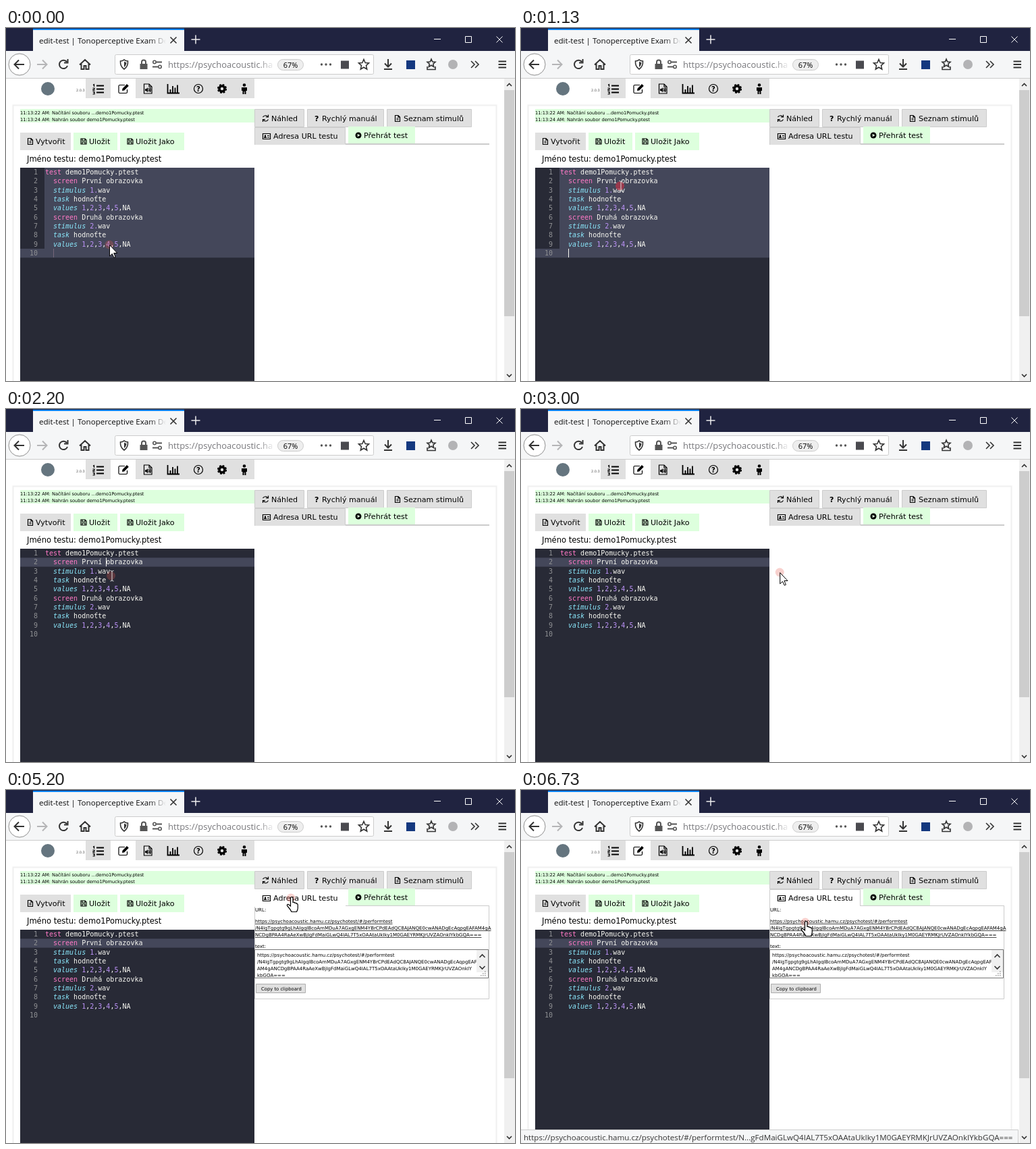
An HTML page for the animation above (8000 ms loop, 754 px wide and 523 px high).

```html
<!DOCTYPE html>
<html lang="cs">
<head>
<meta charset="utf-8">
<title>Test editor</title>
<style>
html, body { margin: 0; height: 100%; overflow: hidden; background: #fff }
svg { display: block; width: 100vw; height: 100vh }
text { font-family: "DejaVu Sans", Verdana, sans-serif; font-size: 11.1px; white-space: pre }
.ui { font-family: "Open Sans", "Noto Sans", sans-serif; font-size: 11.6px }
.code text { font-family: "DejaVu Sans Mono", monospace; font-size: 10px; fill: #f8f8f2 }
.code .num { fill: #909194; text-anchor: end }
.log { font-size: 6.7px }
.small text { font-size: 7px }
.k { fill: #ff79c6 }
.i { fill: #8be9fd; font-style: italic }
.n { fill: #bd93f9 }
.line { fill: none; stroke: #333; stroke-width: 1.6 }
.ico { fill: none; stroke: #000; stroke-width: 1.2 }
.grey { fill: #e0e0e0 }
.green { fill: #dfd }
.tab { fill: #e0e0e0; stroke: #ccc }
</style>
</head>
<body>
<svg viewBox="0 0 754 523" preserveAspectRatio="none">
<defs>
  <linearGradient id="fadeTab"><stop stop-color="#f5f6f7" stop-opacity="0"/><stop offset="1" stop-color="#f5f6f7"/></linearGradient>
  <linearGradient id="fadeUrl"><stop stop-color="#fff" stop-opacity="0"/><stop offset="1" stop-color="#fff"/></linearGradient>
  <clipPath id="area"><path d="M369 237H697V277H369z"/></clipPath>
  <path id="doc" class="ico" d="M-3.5-4.5H1L3.5-2V4.5H-3.5zM1-4.5V-2H3.5M-1.5 0H1.5M-1.5 2H1.5"/>
  <path id="disk" class="ico" d="M-4-4H2L4-2V4H-4zM-2-4V-1H2V-4M-2 4V1H2V4"/>
</defs>

<!-- window frame -->
<path d="M0 0H754V34H0z" fill="#202340"/>
<path d="M40 1H264V34H40z" fill="#f5f6f7"/>
<path d="M40 1H264V3H40z" fill="#0a84ff"/>
<text class="ui" x="49" y="23" fill="#0c0c0d">edit-test | Tonoperceptive Exam Desk</text>
<path d="M212 8H237V30H212z" fill="url(#fadeTab)"/><path d="M237 8H263V30H237z" fill="#f5f6f7"/>
<path class="line" d="M243.500 13.500l9 9m0-9l-9 9"/>
<path d="M281 10.500V23.500M274.500 17H287.500" stroke="#eee" stroke-width="1.500"/>
<path d="M634 16.500H644M680.500 12.500h9v9h-9zM726.500 12.500l9 9m0-9l-9 9" fill="none" stroke="#fff"/>

<!-- toolbar -->
<path d="M0 34H754V75H0z" fill="#f5f6f7"/><path d="M0 74.500H754" stroke="#ccc"/>
<rect x="161.500" y="39.500" width="383" height="29" rx="2" fill="#fff" stroke="#ccc"/>
<circle cx="20" cy="54" r="16" fill="#fff" stroke="#909090"/>
<g class="line">
  <path d="M27 54H13M19 47.500L12.500 54L19 60.500" stroke-width="2"/>
  <path d="M46 54H60M54 47.500L60.500 54L54 60.500" stroke="#b5b5b7" stroke-width="2"/>
  <path d="M90 50A6.200 6.200 0 1 0 91 56M91.500 46V51.500H86" stroke-width="2"/>
  <path d="M109 54.500L117 47L125 54.500M111.500 53V61H115.500V56H118.500V61H122.500V53" stroke-width="2"/>
  <path d="M169.500 49Q173 49 175 47Q177 49 180.500 49Q181 57 175 61Q169 57 169.500 49z"/>
  <path d="M175 49.500Q177 51 178.500 51Q178 56 175 58z" fill="#333" stroke="none"/>
  <path d="M201 53V50.500a3 3 0 0 1 6 0V53" stroke="#555" stroke-width="2"/>
  <path d="M198.500 53h11v8h-11z" fill="#555" stroke="none"/>
  <path d="M223 50.500H231M217 57.500H225" stroke="#555" stroke-width="2"/>
  <circle cx="220" cy="50.500" r="2.200" stroke="#555"/><circle cx="228" cy="57.500" r="2.200" stroke="#555"/>
  <path d="M530 46.500L532.200 51.500L537.500 52L533.500 55.600L534.700 61L530 58.200L525.300 61L526.500 55.600L522.500 52L527.800 51.500z"/>
  <path d="M566 46V57M561 52.500L566 57.500L571 52.500M560 61H572" stroke-width="2"/>
  <path d="M624 57V61.500H636V57M630 46L631.700 50L636 50.400L632.700 53.300L633.700 57.500L630 55.300L626.300 57.500L627.300 53.300L624 50.400L628.300 50z"/>
  <path d="M689 49L694 54L689 59M695 49L700 54L695 59"/>
  <path d="M729.500 49.500H741M729.500 54H741M729.500 58.500H741" stroke-width="1.800"/>
</g>
<g fill="#555"><circle cx="467.500" cy="54" r="1.700"/><circle cx="474" cy="54" r="1.700"/><circle cx="480.500" cy="54" r="1.700"/></g>
<path d="M496 48.500h12v12h-12z" fill="#4a4a4f"/>
<path d="M593 48h13v13h-13z" fill="#14387f"/>
<circle cx="662" cy="54" r="7" fill="#b3b3b5"/>
<text class="ui" x="240" y="59" fill="#77777b" style="font-size:13px">https://psychoacoustic.ha</text>
<path d="M374 44H398V65H374z" fill="url(#fadeUrl)"/>
<rect x="402.500" y="46.500" width="38" height="16" rx="8" fill="#eee" stroke="#ccc"/>
<text class="ui" x="421.500" y="58.500" text-anchor="middle" style="font-size:11px">67%</text>

<!-- page header -->
<path d="M0 75H738V523H0z" fill="#fff"/>
<circle cx="62" cy="90" r="10" fill="#65757f"/>
<text x="104" y="94" style="font-size:5px" fill="#555">2.0.3</text>
<path class="grey" d="M118 75H155V104H118zM192 75H368V104H192z"/>
<path d="M134 85.500H145M134 90.500H145M134 95.500H145" stroke="#000" stroke-width="2.200"/>
<path class="ico" d="M129 84.500L130.500 83.500V87M128.500 89H131V91H129V92.500H131.500M128.500 94.500H131V98H128.500M129.500 96H131"/>
<path class="ico" stroke-width="1.500" d="M176 84.500H168.500Q167 84.500 167 86V95Q167 96.500 168.500 96.500H178Q179.500 96.500 179.500 95V91"/>
<path d="M172 93L172.500 89.800L179 83L181.800 85.800L175.200 92.500z"/>
<path class="ico" stroke-width="1.500" d="M204.500 83H212L216 87V97H204.500zM212 83V87H216M211.500 89Q213 91.500 211.500 94M213.300 88Q215.200 91.500 213.300 95"/>
<path d="M206 90.300h1.800l2.400-2v7l-2.400-2H206z"/>
<path d="M239.500 83V96.500H257M243.500 96V91M247 96V86M250.500 96V88.500M254 96V84.500" fill="none" stroke="#000" stroke-width="1.800"/>
<circle class="ico" cx="285" cy="90" r="6.500" stroke-width="1.500"/>
<text x="285" y="94" text-anchor="middle" font-weight="bold" style="font-size:10px">?</text>
<circle cx="320" cy="90" r="4" fill="none" stroke="#000" stroke-width="3.600"/>
<circle cx="320" cy="90" r="6" fill="none" stroke="#000" stroke-width="2.200" stroke-dasharray="2.712 2"/>
<circle cx="353" cy="84.500" r="2.300"/>
<path d="M349 88H357V93H355.500V98H353.500V94H352.500V98H350.500V93H349z"/>

<!-- card -->
<path d="M10.500 523V114.500H726.500V523" fill="none" stroke="#f0f0f0" stroke-width="2"/>
<path class="green" d="M21 120H368V140H21zM100 155H165V181H100zM169 155H264V181H169z"/>
<path class="grey" d="M21 155H96V181H21z"/>
<text class="log" x="21" y="128">11:13:22 AM: Načítání souboru ...demo1Pomucky.ptest</text>
<text class="log" x="21" y="138">11:13:24 AM: Nahrán soubor demo1Pomucky.ptest</text>
<use href="#doc" x="36" y="168"/><text x="44" y="172">Vytvořit</text>
<use href="#disk" x="115" y="168"/><text x="123" y="172">Uložit</text>
<use href="#disk" x="184" y="168"/><text x="192" y="172">Uložit Jako</text>
<text x="31" y="198" style="font-size:11.500px">Jméno testu: demo1Pomucky.ptest</text>

<!-- tabs -->
<path d="M503 172H716" stroke="#ccc" stroke-width="2"/>
<path class="tab" d="M368.500 120.500H441.500V146.500H368.500zM446.500 120.500H559.500V146.500H446.500zM564.500 120.500H689.500V146.500H564.500z"/>
<path class="green" d="M507 146H606V171H507z"/>
<g id="panel" class="small">
  <path d="M368.500 171.500H715.500V309.500H368.500z" fill="#fff" stroke="#ccc"/>
  <text x="369" y="180">URL:</text>
  <g text-decoration="underline">
    <text x="369" y="197">https://psychoacoustic.hamu.cz/psychotest/#/performtest</text>
    <text x="369" y="207">/N4IgTgpgtg9gLhAIgqIBcoAmMDuA7AGxgENM4YBrCPdEAdQC8AJANQE0cwANADgEcAqpgEAFAM4gA</text>
    <text x="369" y="217">NCDgBPAA4RaAeXwBjIgFdMaiGLwQ4IAL7T5xOAAtaUkIky1M0GAEYRMKJrUVZAOnkIYkbGQA===</text>
  </g>
  <text x="369" y="234">text:</text>
  <path d="M368.500 236.500H714.500V278.500H368.500z" fill="#fff" stroke="#767676"/>
  <g clip-path="url(#area)">
    <text x="372" y="247">https://psychoacoustic.hamu.cz/psychotest/#/performtest</text>
    <text x="372" y="257">/N4IgTgpgtg9gLhAIgqIBcoAmMDuA7AGxgENM4YBrCPdEAdQC8AJANQE0cwANADgEcAqpgEAF</text>
    <text x="372" y="267">AM4gANCDgBPAA4RaAeXwBjIgFdMaiGLwQ4IAL7T5xOAAtaUkIky1M0GAEYRMKJrUVZAOnkIY</text>
    <text x="372" y="277">kbGQA===</text>
  </g>
  <path d="M697 237H714V270H697z" fill="#f0f0f0"/>
  <path class="line" d="M701.500 248L705.500 244L709.500 248M701.500 261L705.500 265L709.500 261"/>
  <path d="M703 275H712M706 272H712M709 269H712" stroke="#999" stroke-width="1.500" stroke-dasharray="1.500 1.500"/>
  <path d="M370.500 287.500H443.500V300.500H370.500z" fill="#e0e0e0" stroke="#adadad"/>
  <text x="378" y="297" style="font-size:6.800px">Copy to clipboard</text>
</g>
<path id="urlTab" d="M368 147H503V173H368z"/>
<path id="urlEdge" d="M368.500 173V147.500H502.500V172" fill="none"/>
<path class="ico" stroke-width="1.500" d="M380.500 132Q382 129.500 385 129.800Q387 130 388 132M388.500 128.500V132H385M388.500 135.500Q387 138.200 384.500 138Q382 137.800 381 135.500M380.500 139V135.500H384"/>
<text x="393" y="138">Náhled</text>
<text x="457" y="138" font-weight="bold">?</text><text x="468" y="138">Rychlý manuál</text>
<use href="#doc" x="580" y="134"/><text x="589" y="138">Seznam stimulů</text>
<path class="ico" d="M380.500 156.500H391.500V164.500H380.500zM387 159.500H390M387 162H390"/>
<path d="M382 163V161.500H383V158.500H385V161.500H386V163z"/>
<text x="396" y="164">Adresa URL testu</text>
<circle cx="522" cy="159" r="4.500"/><path d="M520.700 156.700V161.300L524.500 159z" fill="#dfd"/>
<text x="530" y="163">Přehrát test</text>

<!-- editor -->
<path d="M21 207H368V523H21z" fill="#282a36"/>
<path id="selection" d="M57 207H368V340H57z" fill="#44475a"/>
<rect id="active" x="21" width="347" height="13.300" fill="#44475a"/>
<g class="code" id="code">
  <text x="58"><tspan class="k">test</tspan> demo1Pomucky.ptest</text>
  <text x="70"><tspan class="k">screen</tspan> První obrazovka</text>
  <text x="70"><tspan class="i">stimulus</tspan> <tspan class="n">1.</tspan>wav</text>
  <text x="70"><tspan class="i">task</tspan> hodnoťte</text>
  <text x="70" class="vals"></text>
  <text x="70"><tspan class="k">screen</tspan> Druhá obrazovka</text>
  <text x="70"><tspan class="i">stimulus</tspan> <tspan class="n">2.</tspan>wav</text>
  <text x="70"><tspan class="i">task</tspan> hodnoťte</text>
  <text x="70" class="vals"></text>
  <text x="70"></text>
</g>
<rect id="caret" width="1" height="13"/>

<!-- scrollbar -->
<path d="M738 75H754V523H738z" fill="#f0f0f0"/><path d="M738 92H753V427H738z" fill="#cdcdcd"/>
<path class="line" d="M742 86L745.500 82.500L749 86M742 513L745.500 516.500L749 513"/>

<g id="status">
  <path d="M0 503H737V523H0z" fill="#f5f6f7"/><path d="M0 503.500H736.500V523" fill="none" stroke="#ccc"/>
  <text id="link" class="ui" x="4" y="519" fill="#333">https://psychoacoustic.hamu.cz/psychotest/#/performtest/N...gFdMaiGLwQ4IAL7T5xOAAtaUkIky1M0GAEYRMKJrUVZAOnkIYkbGQA===</text>
</g>

<g id="mouse">
  <circle id="halo" r="6.500"/>
  <path id="arrow" d="M.5.5V17L4.300 13.500L7 19.300L9.200 18.300L6.700 12.500H11.800z" fill="#fff" stroke="#000"/>
  <path id="beam" d="M-1-7.500Q1.500-7.500 1.500-6Q1.500-7.500 4-7.500M1.500-6V7M-1 8Q1.500 8 1.500 6.500Q1.500 8 4 8" fill="none" stroke="#d8d8d8"/>
  <path id="hand" d="M-.5 12V.5Q-.5-1.500 1.300-1.500T3 .5V6.500Q5.500 5.800 5.800 7.500Q8 6.800 8.300 8.500Q10.300 8 10.300 10.500V15Q10.300 17 8.500 20.500H1Q0 18-3 14.500L-5.500 11.500Q-6 9-3.500 9.500Z" fill="#fff" stroke="#000" stroke-width="1.200"/>
</g>
</svg>
<script>
const $ = id => document.getElementById(id);
const show = (id, on) => $(id).style.display = on ? '' : 'none';
const rowTop = row => 207 + (row - 1) * 13.33;
const within = (t, a, b) => t >= a && t < b;
const grey = v => `rgb(${v},${v},${v})`;

document.querySelectorAll('.vals').forEach(el => {
  el.innerHTML = '<tspan class="i">values</tspan> ' +
    [1, 2, 3, 4, 5].map(n => `<tspan class="n">${n}</tspan>,`).join('') + 'NA';
});
[...$('code').children].forEach((el, i) => {
  const y = Math.round(rowTop(i + 1) + 10);
  el.setAttribute('y', y);
  el.insertAdjacentHTML('beforebegin', `<text class="num" x="47" y="${y}">${i + 1}</text>`);
});

// time, x, y of the pointer
const path = [
  [0, 153, 321], [133, 153, 321], [270, 162, 296], [400, 148, 246], [467, 146.5, 234],
  [1600, 146.5, 234], [2000, 153, 244], [2200, 155.5, 247], [2333, 157, 248],
  [2400, 157, 248], [2600, 210, 249], [2867, 340, 250], [3067, 405, 238], [3267, 419, 197],
  [3533, 421, 173], [3800, 422, 160], [5800, 422, 160], [6000, 422, 173],
  [6200, 421, 188], [6600, 421, 196], [8000, 421, 196]
];

function pointer(t) {
  const i = path.findIndex(p => p[0] > t);
  const [t0, x0, y0] = path[i - 1], [t1, x1, y1] = path[i];
  const k = (t - t0) / (t1 - t0);
  return [x0 + (x1 - x0) * k, y0 + (y1 - y0) * k];
}

function draw(t) {
  const picked = t >= 1195, opened = t >= 5195;
  const [x, y] = pointer(t);
  const onTab = x > 368 && within(y, 147, 172);

  show('selection', !picked);
  $('active').setAttribute('y', rowTop(picked ? 2 : 10));
  const lit = [[0, 1665], [2195, 2730], [3260, 3730], [4195, 4330]].some(([a, b]) => within(t, a, b));
  show('caret', lit);
  $('caret').setAttribute('x', picked ? 148 : 70);
  $('caret').setAttribute('y', rowTop(picked ? 2 : 10));
  $('caret').setAttribute('fill', t < 1060 ? '#75677a' : '#f8f8f2');

  show('panel', opened);
  const hover = Math.min(1, Math.max(0, (t - 3530) / 200));
  $('urlTab').setAttribute('fill', grey(224 + 31 * hover));
  $('urlEdge').setAttribute('stroke', grey(onTab ? 204 + 51 * hover : 204));
  show('status', t >= 6660);
  $('link').setAttribute('opacity', t < 6725 ? .5 : 1);

  const kind = onTab || opened && y > 190 ? 'hand' : x < 368 && t >= 395 ? 'beam' : 'arrow';
  for (const id of ['arrow', 'beam', 'hand']) show(id, id === kind);
  const pressed = within(t, 995, 1195) || within(t, 4195, 4325);
  $('halo').setAttribute('fill', pressed ? 'rgba(200,50,70,.65)' : 'rgba(230,90,80,.28)');
  $('mouse').setAttribute('transform', `translate(${x} ${y})`);
}

// the pointer moves at 15 steps a second
const step = 1000 / 15;
let start;
function tick(now) {
  start ??= now;
  const t = (now - start) % 8000;
  draw(Math.floor((t + 5) / step) * step % 8000);
  requestAnimationFrame(tick);
}
draw(0);
requestAnimationFrame(tick);
</script>
</body>
</html>
```
